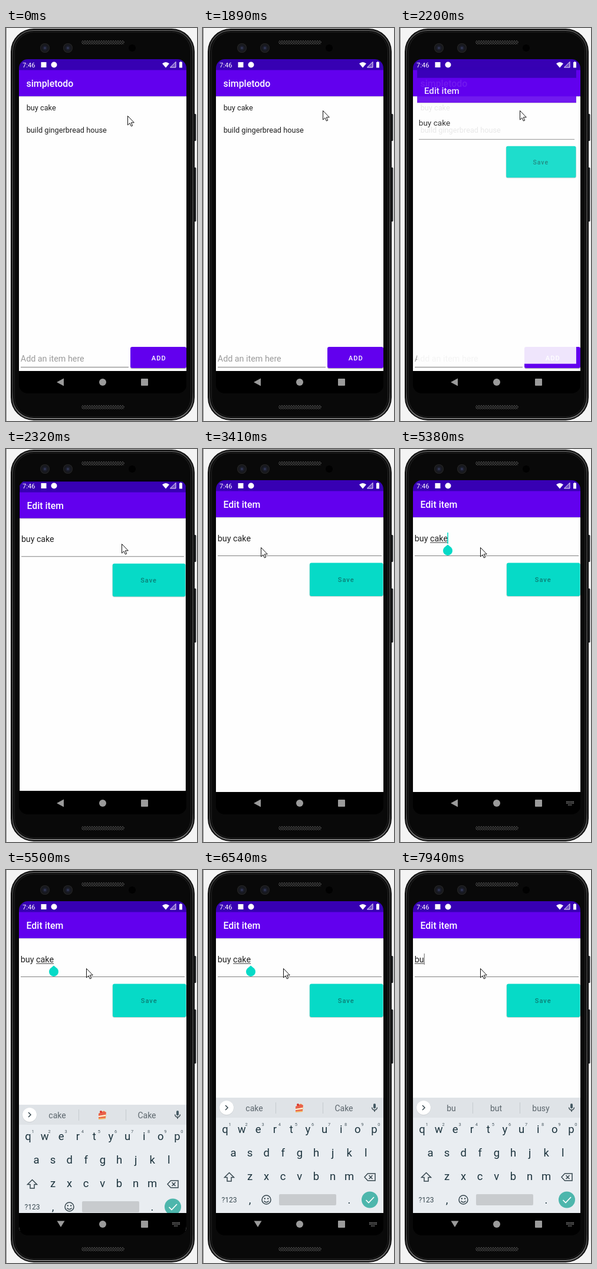
These frames come from a looping animation (324x668 px, 8000 ms). An HTML page:

```html
<!DOCTYPE html>
<html lang="en">
<head>
<meta charset="utf-8">
<title>Todo list on a phone</title>
<style>
html, body { margin: 0; width: 100%; height: 100%; overflow: hidden; background: #f4f4f4; }
svg { display: block; width: 100%; height: 100%; }
text { font-family: Roboto, "Open Sans", sans-serif; white-space: pre; }
.medium { font-weight: 500; }
.mid { text-anchor: middle; }
.title { font-size: 15.91px; fill: #fff; }
.row { font-size: 12.73px; fill: #202020; }
.field { font-size: 14.32px; fill: #202020; }
.button { font-size: 11.1px; letter-spacing: 1px; }
.key { font-size: 18.5px; fill: #1c333d; }
.digit { font-size: 7.5px; fill: #4b5a62; }
.hint { font-size: 14px; fill: #5c666d; }
.icon { fill: none; stroke: #37474f; stroke-width: 1.5; }
</style>
</head>
<body>
<svg viewBox="0 0 324 668" preserveAspectRatio="none">
  <defs>
    <clipPath id="screen"><rect x="22" y="53" width="284" height="568" rx="15"/></clipPath>
    <pattern id="mesh" width="4" height="4" patternUnits="userSpaceOnUse">
      <rect width="4" height="4" fill="#101010"/>
      <path d="M0 0L4 4M4 0L0 4" stroke="#484848" stroke-width=".8"/>
    </pattern>
    <linearGradient id="rim" x2="0" y2="1">
      <stop stop-color="#4a4a4a"/><stop offset=".08" stop-color="#2c2c2c"/>
      <stop offset=".5" stop-color="#444"/><stop offset=".93" stop-color="#333"/>
      <stop offset="1" stop-color="#777"/>
    </linearGradient>
    <radialGradient id="lens">
      <stop stop-color="#3b4268"/><stop offset=".35" stop-color="#1c1e2c"/>
      <stop offset=".75" stop-color="#15161a"/><stop offset="1" stop-color="#292929"/>
    </radialGradient>
  </defs>

  <rect width="324" height="668" fill="#f4f4f4"/>
  <rect width="1" height="668" fill="#8c8c8c"/>
  <g fill="#202224">
    <rect x="317" y="146" width="5.5" height="46" rx="1.5"/>
    <rect x="317" y="237" width="5.5" height="92" rx="1.5"/>
  </g>
  <rect x="8" y="1" width="312" height="666" rx="39" fill="#0b0b0b"/>
  <rect x="11" y="4" width="306" height="660" rx="36" fill="none" stroke="url(#rim)" stroke-width="2"/>
  <rect x="14.5" y="7" width="299" height="654" rx="33" fill="#090909" stroke="#222"/>
  <rect x="128" y="21" width="73" height="7" rx="3.5" fill="url(#mesh)"/>
  <rect x="128" y="641" width="73" height="7" rx="3.5" fill="url(#mesh)"/>
  <circle cx="66" cy="34" r="8" fill="url(#lens)"/>
  <circle cx="105" cy="34" r="8" fill="url(#lens)"/>
  <circle cx="214" cy="34" r="6" fill="#010101"/>

  <g clip-path="url(#screen)">
    <rect x="22" y="53" width="284" height="568"/>
    <g id="listPage">
      <rect x="22" y="53" width="284" height="19" fill="#3700b3"/>
      <rect x="22" y="116" width="284" height="467" fill="#fefefe"/>
      <rect x="22" y="71.5" width="284" height="44.5" fill="#6200ee"/>
      <rect x="22" y="116" width="284" height="1.2" fill="#ddd"/>
      <text class="title medium" x="34.5" y="100">simpletodo</text>
      <text class="row" x="34.7" y="140">buy cake</text>
      <text class="row" x="34.7" y="178">build gingerbread house</text>
      <text class="field" x="24.8" y="567" style="fill:#9b9b9b">Add an item here</text>
      <rect x="25" y="576" width="183" height="1" fill="#777"/>
      <rect x="211" y="543" width="95" height="36.5" rx="3" fill="#bbb"/>
      <rect x="211" y="542" width="95" height="36" rx="3" fill="#6200ee"/>
      <text class="button medium" x="246.8" y="564.5" fill="#fff">ADD</text>
    </g>
    <g id="editPage">
      <rect x="22" y="53" width="284" height="19" fill="#3700b3"/>
      <rect x="22" y="116" width="284" height="467" fill="#fefefe"/>
      <rect x="22" y="71.5" width="284" height="44.5" fill="#6200ee"/>
      <rect x="22" y="116" width="284" height="1.2" fill="#ddd"/>
      <text class="title medium" x="34.5" y="100">Edit item</text>
      <text class="field" id="entry" x="24.8" y="157"></text>
      <rect id="underline" y="158.5" height="1" fill="#333"/>
      <rect x="25" y="181" width="278" height="1" fill="#808080"/>
      <rect x="180.5" y="194" width="125.5" height="57" rx="3.5" fill="#c4cfcd"/>
      <rect x="181" y="193.5" width="124.5" height="56.5" rx="3" fill="#06dac7"/>
      <text class="button medium" x="228.7" y="226" fill="#0b7f76">Save</text>
      <rect id="caret" y="142" height="19"/>
      <path id="handle" d="M81 162.5L86.7 167.3A8 8 0 1 1 75.3 167.3Z" fill="#06dac7"/>
    </g>
    <g id="keyboard">
      <rect x="22" y="387" width="284" height="34" fill="#dfe3e7"/>
      <rect x="22" y="421" width="284" height="180" fill="#e9edf1"/>
      <circle cx="40" cy="404.5" r="12.3" fill="#c9cdd1"/>
      <circle cx="40" cy="404" r="12" fill="#fff"/>
      <path class="icon" d="M38 400l4 4-4 4"/>
      <path d="M123.5 395v19M203.5 395v19" stroke="#c5cace"/>
      <g id="hints"></g>
      <g id="cake">
        <path d="M157 402l9-5 4 3-1 11-12 1z" fill="#f3b45f"/>
        <path d="M157 402l9-4 4 2-1 4-12 2zM157 408l12-1v2l-12 1z" fill="#e8604c"/>
        <path d="M157 406l12-2v2l-12 2z" fill="#fff3dc"/>
        <circle cx="161" cy="399" r="2" fill="#d9342b"/>
      </g>
      <rect x="289" y="397" width="4" height="8.5" rx="2" fill="#455a64"/>
      <path class="icon" d="M286.6 403.5a4.4 4.4 0 0 0 8.8 0M291 408v3" stroke-width="1.2"/>
      <g id="keys"></g>
      <path class="icon" d="M44.500 514.500l8 8h-4.500v6.500h-7v-6.500h-4.500z"/>
      <path class="icon" d="M279.500 516h12.500v12h-12.500l-5.500-6zM281.500 519l6 6M287.500 519l-6 6"/>
      <text class="mid" x="44.5" y="565" font-size="12" fill="#37474f">?123</text>
      <circle class="icon" cx="107.500" cy="560.500" r="7.500"/>
      <path class="icon" d="M103.500 562.500q4 4.500 8 0" stroke-width="1.2"/>
      <circle cx="104.800" cy="558.500" r="1.200" fill="#37474f"/>
      <circle cx="110.200" cy="558.500" r="1.200" fill="#37474f"/>
      <rect x="129" y="551" width="97" height="19" rx="2" fill="#c8cbce"/>
      <text class="key mid" x="79.500" y="567">,</text>
      <text class="key mid" x="248" y="567">.</text>
      <circle cx="283" cy="560.500" r="14" fill="#4db6ac"/>
      <path d="M276.500 561l4.500 4.500 9-9.500" fill="none" stroke="#fff" stroke-width="1.700"/>
    </g>

    <g fill="#fff">
      <text x="28" y="67" font-size="11.1">7:46</text>
      <rect x="59.500" y="58" width="9" height="9"/>
      <circle cx="81.500" cy="62.500" r="5"/>
      <path d="M265 60.500q6-5 12 0l-6 7z"/>
      <path d="M288 57.500v9.500h-9.500z" fill="#fff" fill-opacity=".3" stroke="#fff" stroke-width=".9"/>
      <path d="M295.500 57h2v1h1.500v9.500h-5v-9.500h1.500z"/>
    </g>
    <rect x="22" y="583" width="284" height="38"/>
    <g fill="#9b9b9b">
      <path id="back"/>
      <circle cx="164" cy="602" r="6"/>
      <rect x="229" y="596" width="12" height="12" rx="1"/>
      <path id="imeIcon" d="M282 599.500h13M282 602h13M285 605h7" stroke="#8c8c8c" stroke-width="1.500" stroke-dasharray="1.500 .8"/>
    </g>
  </g>
  <path id="cursor" d="M.5 .5V16L4 12.700 6.400 18 8.700 17 6.300 11.800H11.300Z" fill="#fff" stroke="#111" stroke-width="1" stroke-linejoin="round"/>
</svg>
<script>
const LOOP = 8000;
const $ = id => document.getElementById(id);

// Each timeline holds [start, ...values]; a value lasts until the next start.
const POINTER = [
  [0, 206, 149], [1090, 205, 148], [1220, 205, 147], [1730, 205, 146], [1890, 203, 140],
  [2320, 196, 161], [2860, 188, 160], [2980, 165, 158], [3110, 136, 159], [3250, 124, 161],
  [3410, 98, 167], [3550, 93, 160], [3670, 89, 152], [3920, 89, 150], [4040, 88, 149],
  [4960, 105, 156], [5080, 127, 165], [5240, 135, 167], [5380, 136, 167]
];
const ZOOM = [[0, 0], [2200, .95], [2320, .992], [2460, .998], [2610, 1]];
const ENTRY = [
  [0, 'buy cake'], [6970, 'buy cak'], [7250, 'buy ca'], [7390, 'buy c'],
  [7670, 'buy '], [7800, 'buy'], [7940, 'bu']
];
const HINTS = [
  [0, 'cake', '', 'Cake'], [7090, 'cak', 'cake', 'cakes'], [7250, 'ca', 'can', 'CA'],
  [7390, 'c', 'can', 'C'], [7670, 'a', 'the', 'it'], [7800, 'buy', 'but', 'buying'],
  [7940, 'bu', 'but', 'busy']
];
const CARET = [[0, false], [4700, true], [5500, false], [5950, true], [6540, false], [6970, true]];

const at = (timeline, t) => timeline.findLast(step => step[0] <= t).slice(1);
const show = (id, on) => $(id).setAttribute('display', on ? 'inline' : 'none');
const set = (id, attrs) => {
  for (const name in attrs) $(id).setAttribute(name, attrs[name]);
};
const label = (cls, x, y, s) => `<text class="${cls} mid" x="${x}" y="${y}">${s}</text>`;
const zoom = s => `translate(164 337) scale(${s}) translate(-164 -337)`;

const pen = document.createElement('canvas').getContext('2d');
const widthOf = s => {
  pen.font = '14.32px Roboto, "Open Sans", sans-serif';
  return pen.measureText(s).width;
};

const ROWS = [['qwertyuiop', 37.5, 447], ['asdfghjkl', 51.5, 487], ['zxcvbnm', 79.5, 527]];
$('keys').innerHTML = ROWS.map(([letters, x, y], row) => [...letters].map((c, i) => {
  const cx = x + i * 28.1;
  return label('key', cx, y, c) + (row ? '' : label('digit', cx + 8, 434.5, (i + 1) % 10));
}).join('')).join('');

function draw(t) {
  const [scale] = at(ZOOM, t);
  show('listPage', scale < .99);
  show('editPage', scale > 0);
  set('editPage', { transform: zoom(scale || 1), opacity: scale < .99 ? .9 : 1 });

  const [entry] = at(ENTRY, t);
  const typing = t >= 6970;
  $('entry').textContent = entry;
  const wordStart = entry.lastIndexOf(' ') + 1;
  const left = 24.8 + widthOf(entry.slice(0, wordStart));
  const right = 24.8 + widthOf(entry);
  set('underline', { x: left, width: t >= 5080 ? right - left : 0 });
  set('caret', typing
    ? { x: right, width: 1, fill: '#666' }
    : { x: right - .8, width: 1.6, fill: '#06dac7' });
  show('caret', at(CARET, t)[0]);
  show('handle', t >= 4820 && !typing);

  const keyboardUp = t >= 5500;
  show('keyboard', keyboardUp);
  set('keyboard', { transform: `translate(0 ${t < 5660 ? 12 : 0})` });
  $('hints').innerHTML = at(HINTS, t).map((s, i) => label('hint', 87 + i * 76, 409.5, s)).join('');
  show('cake', t < 7090);

  show('imeIcon', t >= 5080);
  set('back', { d: keyboardUp ? 'M86.500 596.500h13l-6.500 10.500z' : 'M86 602l12-6.500v13z' });
  set('cursor', { transform: `translate(${at(POINTER, t)})` });
}

const start = performance.now();
function frame() {
  draw((performance.now() - start) % LOOP);
  requestAnimationFrame(frame);
}
frame();
</script>
</body>
</html>
```
